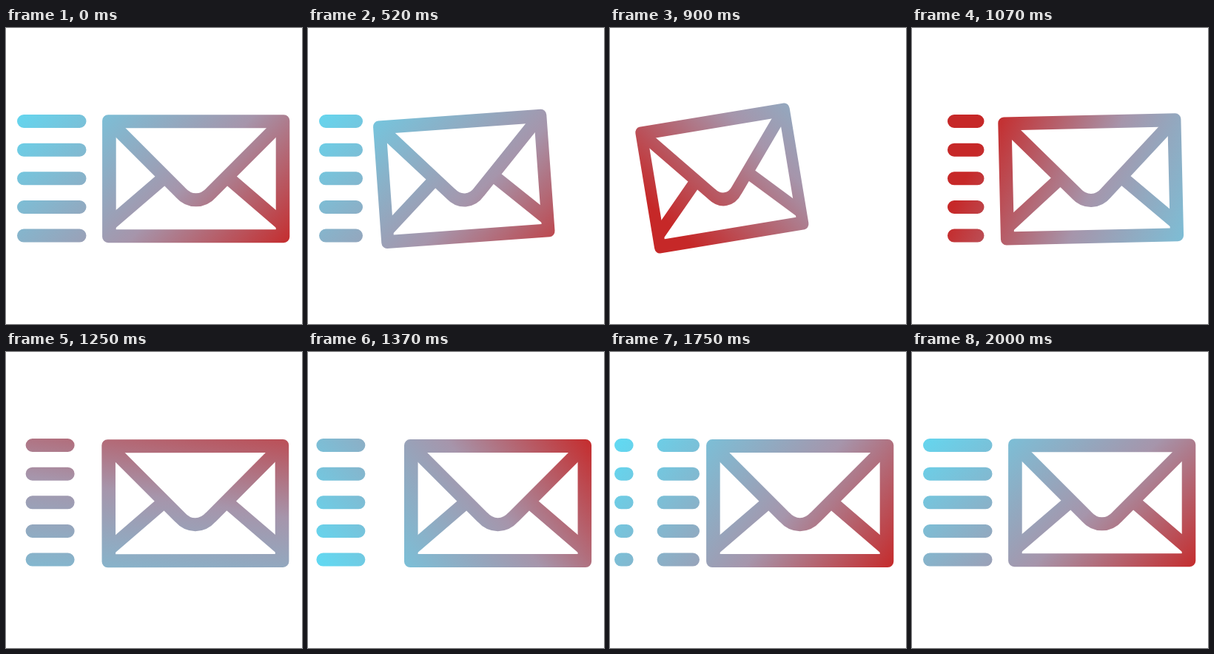
Animation of 400x400 px, one loop 2020 ms. Source, as an HTML page with a canvas:

```html
<!DOCTYPE html>
<html lang="en">
<head>
<meta charset="utf-8">
<title>Flying envelope</title>
<style>
  html, body { margin: 0; width: 100%; height: 100%; overflow: hidden; background: #fff; }
  canvas { display: block; width: 400px; height: 400px; }
</style>
</head>
<body>
<canvas id="stage" width="400" height="400"></canvas>
<script>
const ctx = document.getElementById('stage').getContext('2d');
const LOOP = 2020, START = 520, END = 2000;
const BAR_YS = [126, 164.7, 203.3, 242, 280.6];
const DASH = 48, PERIOD = 98, SPEED = 0.122;

// pull: 0 = at rest on the right, 1 = drawn back, squashed and tilted
const PULL = [[520, .41], [600, .58], [700, .8], [790, .96], [850, 1], [900, .93],
  [950, .72], [1020, .28], [1090, .1], [1170, .03], [1250, .007], [1400, 0]];
// direction of the gradient in degrees
const TURN = [[520, 46], [900, 136], [1250, 281], [1500, 360], [1750, 398], [2000, 405]];

// Monotone cubic curve through [time, value] points
function curve(pts, t) {
  const n = pts.length - 1;
  if (t <= pts[0][0]) return pts[0][1];
  if (t >= pts[n][0]) return pts[n][1];
  let i = 0;
  while (t >= pts[i + 1][0]) i++;
  const rise = k => (pts[k + 1][1] - pts[k][1]) / (pts[k + 1][0] - pts[k][0]);
  const slope = k => {
    if (k === 0) return rise(0);
    if (k === n) return rise(n - 1);
    const a = rise(k - 1), b = rise(k);
    return a * b <= 0 ? 0 : 2 * a * b / (a + b);
  };
  const h = pts[i + 1][0] - pts[i][0], u = (t - pts[i][0]) / h, v = 1 - u;
  return v * v * (1 + 2 * u) * pts[i][1] + u * u * (3 - 2 * u) * pts[i + 1][1]
    + h * u * v * (v * slope(i) - u * slope(i + 1));
}

// Three colours turning about a fixed point, the middle one on that point
function gradient(deg) {
  const a = deg * Math.PI / 180, dx = Math.cos(a), dy = Math.sin(a);
  const cx = 250, cy = 203, back = 235, ahead = 163;
  const g = ctx.createLinearGradient(cx - back * dx, cy - back * dy, cx + ahead * dx, cy + ahead * dy);
  g.addColorStop(0, '#62d8f1');
  g.addColorStop(back / (back + ahead), '#a695ab');
  g.addColorStop(1, '#c62828');
  return g;
}

function bars(from, to) {
  if (to < from) return;
  ctx.lineCap = 'round';
  ctx.beginPath();
  for (const y of BAR_YS) {
    ctx.moveTo(from, y);
    ctx.lineTo(to + 0.01, y);
  }
  ctx.stroke();
}

// Dashes streaming left, cut off at both ends of the track
function stream(t, right) {
  const first = 72 - SPEED * (t - 1750);
  const x0 = ((first % PERIOD) + PERIOD) % PERIOD;
  for (let x = x0 - PERIOD; x < right; x += PERIOD) {
    bars(Math.max(15, x), Math.min(right, x + DASH));
  }
}

function movingBars(t) {
  const d = t - START;
  if (d < 70) bars(24 - SPEED * d, 65 - 0.78 * d);
  else if (t > 1010) stream(t, Math.min(112, 66 + 0.45 * (t - 1020)));
}

function envelope(cx, cy, angle, squash) {
  ctx.save();
  ctx.translate(cx, cy);
  ctx.rotate(angle * Math.PI / 180);
  ctx.scale(squash, 1);

  ctx.beginPath();
  ctx.roundRect(-126.6, -86.5, 253.2, 173, 8);
  ctx.rect(-108, -68.5, 216, 137);
  ctx.fill('evenodd');

  ctx.lineCap = 'butt';
  ctx.beginPath();
  ctx.moveTo(-117, -77.5);
  ctx.lineTo(-21, 18.5);
  ctx.bezierCurveTo(-9, 32, 9, 32, 21, 18.5);
  ctx.lineTo(117, -77.5);
  for (const side of [-1, 1]) {
    ctx.moveTo(117 * side, 62);
    ctx.lineTo(46 * side, 1);
  }
  ctx.stroke();
  ctx.restore();
}

// Lay a fill over (or under) what is already drawn
function flood(mode, style) {
  ctx.globalCompositeOperation = mode;
  ctx.fillStyle = style;
  ctx.fillRect(0, 0, 400, 400);
  ctx.globalCompositeOperation = 'source-over';
}

function draw(t) {
  const rest = t < START || t >= END;
  // 40 pictures a second, shown for 30 and 20 ms in turn
  const d = t - START;
  const time = START + 25 * (2 * Math.floor(d / 50) + (d % 50 >= 30 ? 1 : 0));

  ctx.clearRect(0, 0, 400, 400);
  ctx.fillStyle = ctx.strokeStyle = '#000';
  ctx.lineWidth = 18;
  if (rest) {
    bars(24, 99.5);
    envelope(256.7, 203.7, 0, 1);
  } else {
    const p = curve(PULL, time);
    movingBars(time);
    envelope(256.7 - 112 * p, 204.6 - 1.7 * p, -10 * p, 1 - 0.177 * p);
  }
  flood('source-in', gradient(rest ? 45 : curve(TURN, time)));
  flood('destination-over', '#fff');
}

const t0 = performance.now();
function tick() {
  draw((performance.now() - t0) % LOOP);
  requestAnimationFrame(tick);
}
tick();
</script>
</body>
</html>
```
